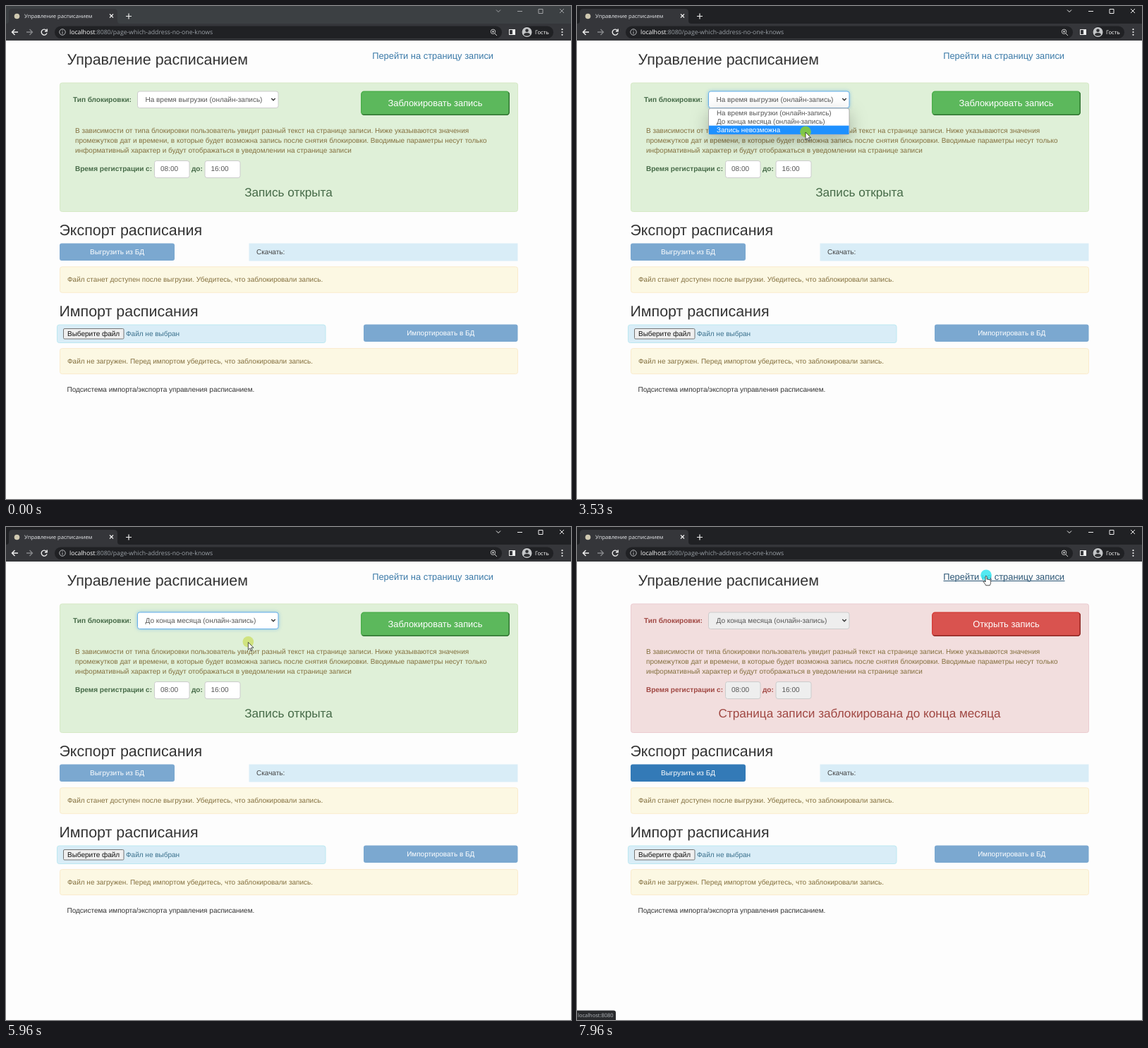
An HTML page for the animation above (8 s loop, 801 by 699 pixels).

```html
<!DOCTYPE html>
<html lang="ru">
<head>
<meta charset="utf-8">
<title>Управление расписанием</title>
<style>
  html, body { margin: 0; width: 100%; height: 100%; overflow: hidden; background: #fdfdfd; }
  svg { position: absolute; left: 0; top: 0; }
  text { font-family: "Liberation Sans", Arial, sans-serif; text-rendering: geometricPrecision; white-space: pre; }
  .ui { font-family: "Open Sans", "Noto Sans", sans-serif; }
  .popup { filter: drop-shadow(0 8px 12px rgba(0, 0, 0, .26)); }
  .glow { filter: drop-shadow(0 0 2.5px rgba(102, 175, 233, .7)); }
</style>
</head>
<body>
<svg width="801" height="699">
  <g id="scene"></g>
  <circle id="click" r="7.8"/>
  <g id="pointer" stroke="#222" stroke-width=".8" stroke-linejoin="round" fill="#fff">
    <path id="arrow" d="M0 0V10.6L2.5 8.4L4.2 12.2L5.9 11.4L4.2 7.7H7.6Z"/>
    <path id="hand" d="M-1 1.2Q0 -.4 1.1 1.2V5.2Q2.3 4.5 3.1 5.5Q4.3 4.9 5 6Q6.6 5.8 6.6 7.4V9.5Q6.5 12 5.2 13.8H-.3Q-1.4 11.4-3.7 9Q-4.3 7.2-2.6 7.6L-1 9Z"/>
  </g>
</svg>
<script>
const LOOP = 8000;
const SHIFT = 28;
const OPTIONS = ['На время выгрузки (онлайн-запись)', 'До конца месяца (онлайн-запись)', 'Запись невозможна'];
const OPTION_TOP = 145;
const OPTION_HEIGHT = 12.3;
const BROWN = '#84703f';

// Pointer path: time, x, y
const PATH = [
  [1090, 510, 325], [1800, 344, 141], [1910, 341, 134], [2300, 341, 134], [2510, 340, 140],
  [2650, 340, 140], [3220, 324, 179], [3800, 324, 179], [4270, 335, 148], [4600, 335, 133],
  [5070, 335, 133], [5290, 326, 165], [5850, 326, 165], [6520, 563, 144], [7100, 563, 144],
  [7420, 580, 69], [LOOP, 580, 69]
];

// Click marks: start, end, colour
const CLICKS = [
  [1910, 2510, '#e3c02f'], [3530, 3860, '#8fd02a'], [4830, 5000, '#e3c02f'],
  [5730, 6060, '#c3d52a'], [6640, 6980, '#a9d80a'], [7960, 8100, '#35e6f0']
];

const $ = id => document.getElementById(id);
const text = (x, y, str, size = 10, fill = '#333', extra = '') =>
  `<text x="${x}" y="${y}" font-size="${size}" fill="${fill}" ${extra}>${str}</text>`;
const heading = (x, y, str) => text(x, y, str, 21.45);
const bold = (x, y, str, fill) => text(x, y, str, 10, fill, 'font-weight="700"');
const centered = (x, y, str, size, fill) => text(x, y, str, size, fill, 'text-anchor="middle"');
const ui = (x, y, str, size, fill) => text(x, y, str, size, fill, 'class="ui"');
const box = (x, y, w, h, fill, stroke = 'none', r = 3, extra = '') =>
  `<rect x="${x}" y="${y}" width="${w}" height="${h}" rx="${r}" fill="${fill}" stroke="${stroke}" ${extra}/>`;
const line = (d, stroke, width = 1) =>
  `<path d="${d}" fill="none" stroke="${stroke}" stroke-width="${width}"/>`;
const disc = (x, y, r, fill, stroke = 'none') =>
  `<circle cx="${x}" cy="${y}" r="${r}" fill="${fill}" stroke="${stroke}"/>`;

function browser(active) {
  const control = active ? '#eee' : '#a0a2a5';
  return box(0, 0, 801, 26, active ? '#202124' : '#3c4043', 'none', 0) +
    `<path d="M0 25Q4 25 4 21V9Q4 4 9 4H153Q158 4 158 9V21Q158 25 162 25H801V49H0Z" fill="#35363a"/>` +
    disc(15.5, 14.5, 3.8, '#cfc8b0') +
    ui(26, 17.2, 'Управление расписанием', 7.6, '#e8eaed') +
    line('M147 11.5L152 16.5M152 11.5L147 16.5M170 14.5H178M174 10.5V18.5', '#eee', 1.2) +
    line('M695 5.5L698 8.5L701 5.5M725 7.5H732M755 4.5H761V10.5H755ZM785 4L791 10M791 4L785 10', control) +
    line('M17 37H8.5M12.5 33L8.5 37L12.5 41', '#f1f1f1', 1.4) +
    line('M29 37H37.5M33.5 33L37.5 37L33.5 41', '#85878a', 1.3) +
    line('M57.2 34.5A4 4 0 1 0 58 38.4M58.2 32.5V35.7H55', '#f1f1f1', 1.4) +
    box(69, 28.5, 634, 17.5, '#202124', 'none', 8.7) +
    disc(80, 37, 4.2, 'none', '#b8babd') + line('M80 36.3V39.5M80 34.3V35.3', '#b8babd') +
    ui(90, 40.2, '<tspan fill="#fff">localhost</tspan>:8080/page-which-address-no-one-knows', 8.7, '#9aa0a6') +
    disc(690.5, 36.3, 3.2, 'none', '#ccc') + line('M693 39L696 42M689 36.3H692M690.5 34.8V37.8', '#ccc') +
    box(713.5, 33.5, 8, 7, 'none', '#f1f1f1', 0) + box(718, 33, 4, 8, '#f1f1f1', 'none', 0) +
    box(731, 28.5, 45, 17.5, '#202124', 'none', 8.7) +
    disc(738.5, 37, 7, '#c4c6c8') + disc(738.5, 34.7, 2.3, '#303134') +
    `<path d="M734 41Q734 38 738.5 38T743 41Q738.5 44 734 41Z" fill="#303134"/>` +
    ui(750, 40, 'Гость', 7.7, '#fff') +
    [33.2, 37, 40.8].map(y => disc(788.5, y, 1.1, '#eee')).join('');
}

// Raised button: light top and left edges, dark bottom and right ones
function lockButton(s) {
  const [fill, light, dark] = s.locked
    ? (s.buttonLit ? ['#c9302c', '#ac2925', '#761c19'] : ['#d9534f', '#d43f3a', '#8d2a27'])
    : (s.buttonLit ? ['#449d44', '#398439', '#255625'] : ['#5cb85c', '#4cae4c', '#337433']);
  return box(503.7, 121.2, 209.6, 33.1, fill, light, 4, 'stroke-width="1.4"') +
    line('M504.9 153.1Q506 154.3 507.7 154.3H709.3Q713.3 154.3 713.3 150.3V125.2Q713.3 123.5 712.1 122.4', dark, 1.4) +
    centered(608.5, 142, s.locked ? 'Открыть запись' : 'Заблокировать запись', 12.9, '#fff');
}

function lockPanel(s) {
  const ink = s.locked ? '#a04843' : '#466a48';
  const field = s.locked ? '#eee' : '#fff';
  const input = (x, y, w, value) =>
    box(x + .5, y, w - 1, 24, field, '#ccc') + text(x + 9, y + 14.5, value, 10, '#555');

  const times = s.tall
    ? text(98, 230.5, 'В регистратуре:', 12.9, ink) +
      text(98, 254.8, 'На сервисе сетекруги:', 12.9, ink) +
      [['30.04.2022', '08:00', 219.5], ['28.04.2022', '22:00', 244]].map(([date, time, y]) =>
        bold(243.5, y + 14.8, 'Дата начала:', ink) + input(310.5, y, 79, date) +
        bold(411.5, y + 14.8, 'с:', ink) + input(423, y, 50.5, time)).join('') +
      bold(476, 234.3, 'до:', ink) + input(495, 219.5, 50.5, '16:00')
    : bold(98, 234, 'Время регистрации с:', ink) + input(210, 219.5, 50.5, '08:00') +
      bold(263, 234, 'до:', ink) + input(281.5, 219.5, 51, '16:00');

  return box(76.5, 109, 649, 182.5 + (s.tall ? SHIFT : 0), s.locked ? '#f2dede' : '#dff0d8', s.locked ? '#ebccd1' : '#d6e9c6') +
    bold(95, 135.7, 'Тип блокировки:', ink) +
    box(186.5, 121, 199.5, 23.5, field, s.focus ? '#66afe9' : '#ccc', 3, s.focus ? 'class="glow"' : '') +
    text(197.5, 136.2, OPTIONS[s.choice], 10, '#555') +
    line('M376.3 131L379 133.8L381.7 131', '#333', 1.4) +
    lockButton(s) +
    text(98, 179.8, 'В зависимости от типа блокировки пользователь увидит разный текст на странице записи. Ниже указываются значения', 10, BROWN) +
    text(98, 194, 'промежутков дат и времени, в которые будет возможна запись после снятия блокировки. Вводимые параметры несут только', 10, BROWN) +
    text(98, 208.3, 'информативный характер и будут отображаться в уведомлении на странице записи', 10, BROWN) +
    times +
    centered(400.5, s.tall ? 297.2 : 269.6, s.locked ? 'Страница записи заблокирована до конца месяца' : 'Запись открыта', 17.16, ink);
}

function transferPanels(s) {
  const button = (x, y, w, label, enabled) =>
    box(x, y, w, 24.4, enabled ? '#337ab7' : '#7ba8d0') + centered(x + w / 2, y + 15.8, label, 10, '#fff');
  const notice = (y, h, message) =>
    box(76.5, y, 649, h, '#fcf8e3', '#faebcc') + text(87, y + 21.5, message, 10, BROWN);

  return `<g transform="translate(0 ${s.tall ? SHIFT : 0})">` +
    heading(75.4, 324.7, 'Экспорт расписания') +
    button(76, 336.5, 163, 'Выгрузить из БД', s.locked) +
    box(344.5, 336.5, 381, 25, '#d9edf7', 'none', 0) + text(355, 352.4, 'Скачать:', 10, '#444') +
    notice(369.8, 36.5, 'Файл станет доступен после выгрузки. Убедитесь, что заблокировали запись.') +
    heading(75.4, 439.9, 'Импорт расписания') +
    box(72.5, 452, 380.5, 25.5, '#d9edf7', '#bce8f1') +
    box(81.5, 457.5, 85.5, 14.5, '#efefef', '#767676', 1.5) +
    text(87, 468.2, 'Выберите файл', 10, '#111') + text(170, 468.2, 'Файл не выбран', 10, '#3b718d') +
    button(507, 451.5, 218.5, 'Импортировать в БД', false) +
    notice(485.6, 36, 'Файл не загружен. Перед импортом убедитесь, что заблокировали запись.') +
    text(86.5, 546.8, 'Подсистема импорта/экспорта управления расписанием.') + '</g>';
}

function dropdown(s) {
  return box(186.5, OPTION_TOP, 199.5, 37.2, '#fff', '#aaa', 3, 'class="popup"') +
    OPTIONS.map((label, i) => {
      const y = OPTION_TOP + OPTION_HEIGHT * i;
      const lit = i === s.hovered;
      return (lit ? box(187, y, 198.5, OPTION_HEIGHT, '#1e90ff', 'none', 0) : '') +
        text(198, y + 9.6, label, 9.8, lit ? '#fff' : '#555');
    }).join('');
}

const draw = s => browser(s.active) +
  heading(86.5, 82.6, 'Управление расписанием') +
  text(519.2, 75, 'Перейти на страницу записи', 12.9, s.linkLit ? '#2c5675' : '#3b7aa8') +
  (s.linkLit ? line('M519.5 76.5H691.5', '#2c5675') : '') +
  lockPanel(s) + transferPanels(s) + (s.open ? dropdown(s) : '') +
  (s.status ? box(-4, 685.5, 59, 18, '#292a2d') + ui(1, 695.3, 'localhost:8080', 7.5, '#b5b8bc') : '');

function pointerAt(t) {
  const i = PATH.findIndex(point => point[0] > t);
  if (i < 1) return [PATH[0][1], PATH[0][2]];
  const [t0, x0, y0] = PATH[i - 1];
  const [t1, x1, y1] = PATH[i];
  const k = (t - t0) / (t1 - t0);
  const eased = k * k * (3 - 2 * k);
  return [x0 + (x1 - x0) * eased, y0 + (y1 - y0) * eased];
}

const within = (t, from, to) => t >= from && t < to;

function stateAt(t, x, y) {
  const overButton = x > 503 && x < 714 && y > 120 && y < 155 && t > 5850;
  const row = Math.min(2, Math.floor((y - OPTION_TOP) / OPTION_HEIGHT));
  const choice = t < 3640 ? 0 : t < 5840 ? 2 : 1;
  const open = within(t, 2110, 3640) || within(t, 4830, 5840);
  return {
    active: t >= 1910,
    focus: within(t, 2220, 6640),
    choice,
    tall: choice === 2,
    locked: t >= 6860,
    buttonLit: overButton || within(t, 6640, 7960),
    linkLit: t > 7100 && y < 77,
    status: t >= 7630,
    open,
    hovered: open ? (row < 0 ? choice : row) : -1,
    overButton
  };
}

const show = (id, visible) => { $(id).style.display = visible ? '' : 'none'; };
const start = performance.now();
let drawn = '';

function frame() {
  const t = (performance.now() - start) % LOOP;
  const [x, y] = pointerAt(t);
  const state = stateAt(t, x, y);
  const key = JSON.stringify(state);
  if (key !== drawn) {
    $('scene').innerHTML = draw(state);
    drawn = key;
  }
  const hand = state.overButton || state.linkLit;
  $('pointer').setAttribute('transform', `translate(${x} ${y})`);
  show('pointer', t >= PATH[0][0]);
  show('arrow', !hand);
  show('hand', hand);

  const click = CLICKS.find(([from, to]) => within(t, from, to));
  show('click', click);
  if (click) {
    const [from, to, colour] = click;
    const left = (to - t) / (to - from);
    const mark = $('click');
    mark.setAttribute('cx', x);
    mark.setAttribute('cy', y - .7);
    mark.setAttribute('fill', colour);
    mark.setAttribute('opacity', .85 * Math.min(1, left * 2));
  }
  requestAnimationFrame(frame);
}
frame();
</script>
</body>
</html>
```
